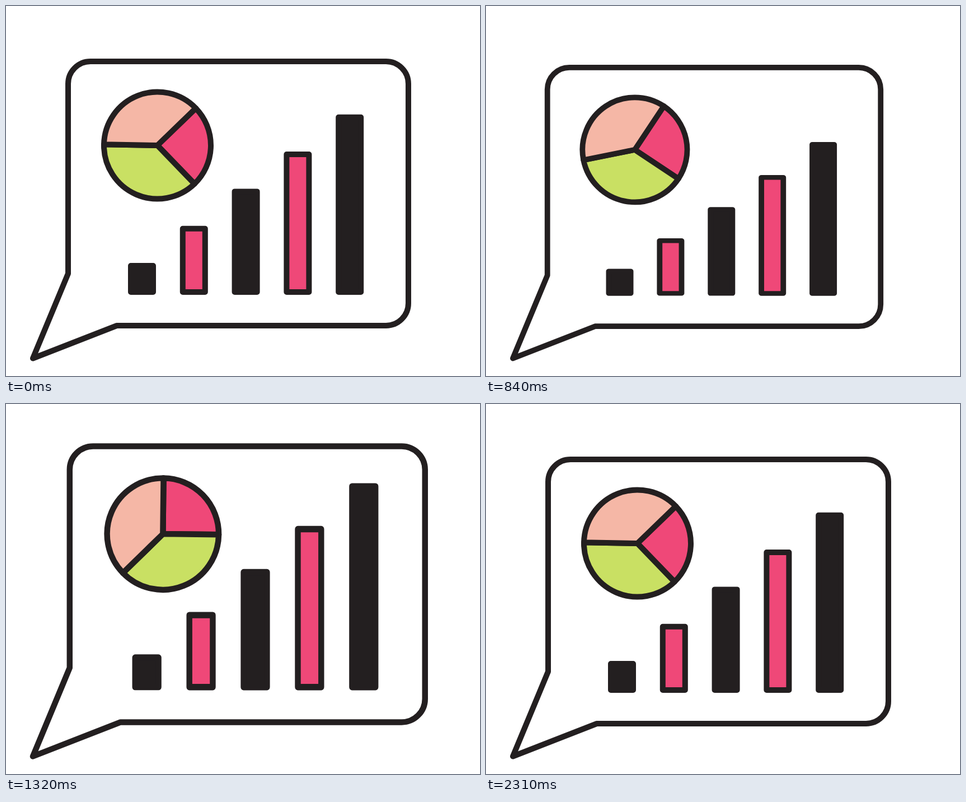
An HTML page for the animation above (2.37 s loop, 847 px wide and 661 px high).

```html
<!DOCTYPE html>
<html lang="en">
<head>
<meta charset="utf-8">
<title>Chart bubble</title>
<style>
  html, body { margin: 0; height: 100%; overflow: hidden; background: #fff; }
  svg { display: block; width: 100%; height: 100%; }
  #bubble { fill: #fff; stroke: #231f20; stroke-width: 10; stroke-linejoin: round; }
</style>
</head>
<body>
<svg viewBox="0 0 847 661">
  <g id="bubble">
    <path d="M111 478V139A40 40 0 0 1 151 99H679A40 40 0 0 1 719 139V531A40 40 0 0 1 679 571H198L48 629.5Z"/>
    <g id="pie"></g>
    <g id="bars"></g>
  </g>
</svg>
<script>
const LOOP = 2370, STEP = 30;
const INK = '#231f20', PINK = '#ef4878', PEACH = '#f5b7a6', GREEN = '#c9e063';
const TIP = [48, 629.5], PIE = [270.5, 249], RADIUS = 95.5, BASE = 511, LAG = 35;

const out = p => p * (2 - p);
const smooth = p => p * p * (3 - 2 * p);
const smoother = p => p ** 3 * (p * (6 * p - 15) + 10);

// Value at t after a series of eased moves, each { from, to, by, ease }
function follow(value, moves, t) {
  for (const { from, to, by, ease } of moves) {
    value += by * ease(Math.min(1, Math.max(0, (t - from) / (to - from))));
  }
  return value;
}

// Shrink, swell, settle
const bubbleScale = t => follow(1, [
  { from: 360, to: 720, by: -.06, ease: smooth },
  { from: 720, to: 1035, by: .1215, ease: smooth },
  { from: 1200, to: 1545, by: -.0615, ease: smooth }
], t);

const barScale = t => follow(1, [
  { from: 490, to: 830, by: -.152, ease: out },
  { from: 830, to: 1190, by: .252, ease: out },
  { from: 1190, to: 1610, by: -.1, ease: smooth }
], t);

// Wind up, spin past a full turn, drift back
const pieAngle = t => follow(0, [
  { from: 360, to: 700, by: -25, ease: out },
  { from: 700, to: 1580, by: 403, ease: smoother },
  { from: 1580, to: 2310, by: -18, ease: out }
], t);

const $ = id => document.getElementById(id);

function add(parent, tag, attrs) {
  const el = document.createElementNS('http://www.w3.org/2000/svg', tag);
  for (const name in attrs) el.setAttribute(name, attrs[name]);
  return parent.appendChild(el);
}

function slice(from, to, fill) {
  const rim = deg => {
    const a = deg * Math.PI / 180;
    return `${RADIUS * Math.cos(a)} ${RADIUS * Math.sin(a)}`;
  };
  add($('pie'), 'path', { d: `M0 0L${rim(from)}A${RADIUS} ${RADIUS} 0 0 1 ${rim(to)}Z`, fill });
}

slice(-44, 46, PINK);
slice(46, 181, GREEN);
slice(181, 316, PEACH);

const bars = Array.from({ length: 5 }, (_, i) => {
  const height = 47 + 66.3 * i;
  return add($('bars'), 'rect', {
    x: 223 + 92.8 * i, y: -height, width: 40, height, fill: i % 2 ? PINK : INK
  });
});

function draw(now) {
  const t = Math.floor(now % LOOP / STEP) * STEP;
  $('bubble').setAttribute('transform',
    `translate(${TIP}) scale(${bubbleScale(t)}) translate(${-TIP[0]} ${-TIP[1]})`);
  $('pie').setAttribute('transform', `translate(${PIE}) rotate(${pieAngle(t)})`);
  bars.forEach((bar, i) => bar.setAttribute('transform',
    `translate(0 ${BASE}) scale(1 ${barScale(t - LAG * i)})`));
}

const start = performance.now();
function tick() {
  draw(performance.now() - start);
  requestAnimationFrame(tick);
}
tick();
</script>
</body>
</html>
```
